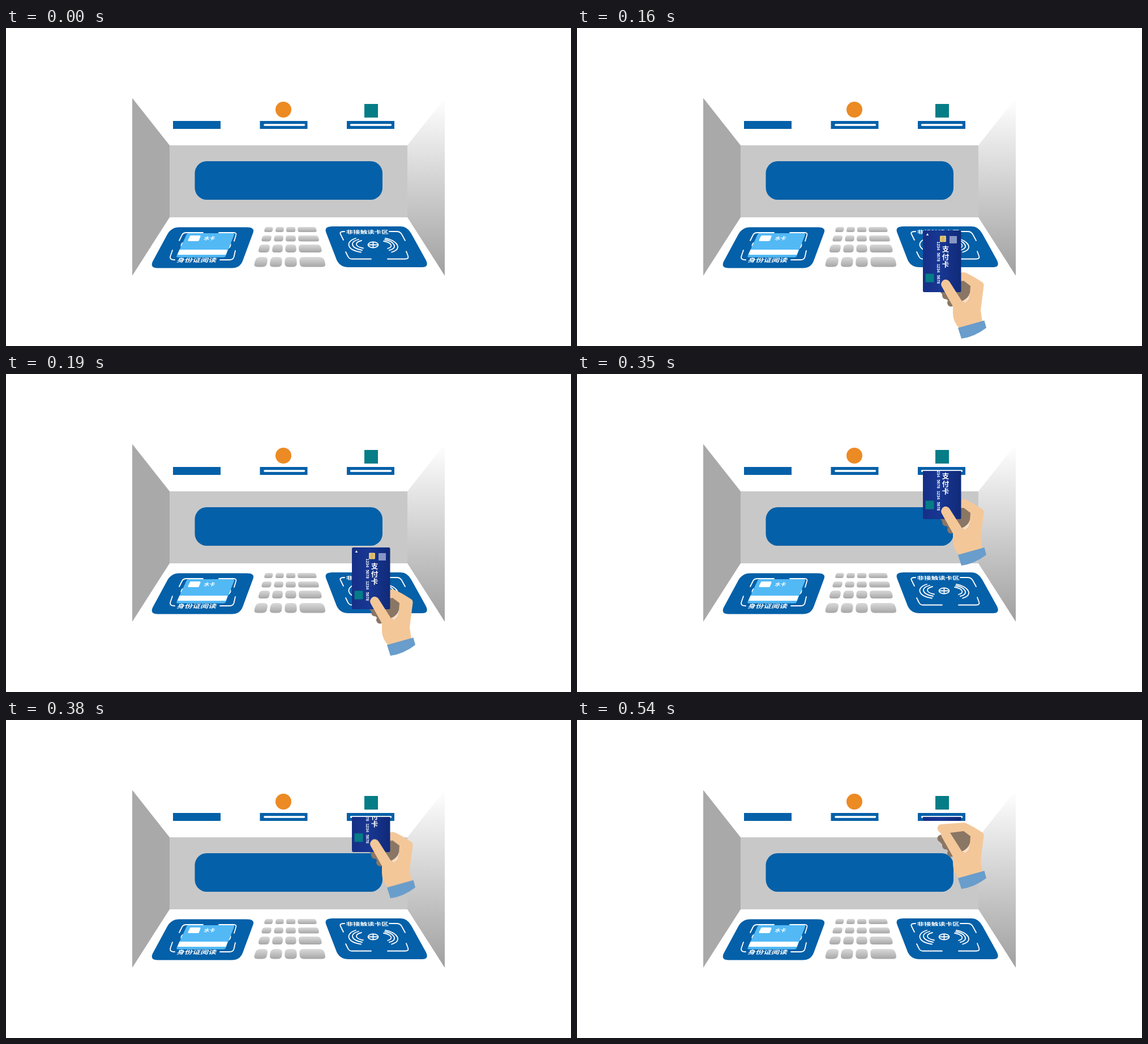
An HTML page for the animation above (1.37 s loop, 998 by 561 pixels).

```html
<!DOCTYPE html>
<html lang="zh">
<head>
<meta charset="utf-8">
<title>插卡演示</title>
<style>
  html, body { margin: 0; width: 100%; height: 100%; overflow: hidden; background: #fff; }
  svg { display: block; }
  text { font-family: "Noto Sans CJK SC", "Noto Sans CJK", sans-serif; font-weight: 700; fill: #fff; text-anchor: middle; }
  .digits { font-family: Arial, "Liberation Sans", sans-serif; font-size: 7px; word-spacing: 2.2px; text-anchor: start; }
  .blue { fill: #0460a8; }
  .line { fill: none; stroke: #fff; stroke-width: 1.8; stroke-linecap: round; stroke-linejoin: round; }
  .skin { fill: #f4c799; }
  .shade { fill: #8a7664; }
</style>
</head>
<body>
<svg width="998" height="561" viewBox="0 0 998 561">
  <defs>
    <linearGradient id="wall" x2="0" y2="1">
      <stop offset="0" stop-color="#fff"/>
      <stop offset="1" stop-color="#a0a0a0"/>
    </linearGradient>
    <linearGradient id="key" x2="0" y2="1">
      <stop offset="0" stop-color="#dadada"/>
      <stop offset="1" stop-color="#a6a6a6"/>
    </linearGradient>
    <linearGradient id="navy">
      <stop offset="0" stop-color="#162f86"/>
      <stop offset=".45" stop-color="#183793"/>
      <stop offset="1" stop-color="#102a78"/>
    </linearGradient>
    <clipPath id="slot"><rect x="600" y="171" width="100" height="390"/></clipPath>
  </defs>

  <!-- booth -->
  <path d="M223 123.500L289 207V334L223 437Z" fill="#a9a9a9"/>
  <path d="M775 123.500L709 207V334L775 437Z" fill="url(#wall)"/>
  <path d="M289 207H709V334H289Z" fill="#c8c8c8"/>
  <rect class="blue" x="333.500" y="235" width="331.500" height="68" rx="21"/>

  <!-- slots and marks -->
  <path class="blue" d="M295 164h84v14h-84ZM448.500 164h84v14h-84ZM602 164h84v14h-84Z"/>
  <path class="line" d="M457 171H526.500M609.500 171H679.500" style="stroke-width:3.6"/>
  <circle cx="490" cy="144" r="14" fill="#ec8a24"/>
  <rect x="633" y="134" width="24" height="24" fill="#057d87"/>

  <!-- left reader -->
  <path class="blue" d="M306 351.500H425Q440 351.500 436.500 361L418 411Q413 423.500 399 423.500H268Q254 423.500 259 412L285 364Q292 351.500 306 351.500Z"/>
  <path class="line" d="M306 375L311 365Q313 361 319 361H348M376 361H402Q408 361 406 366L403 376M294 392L290.500 402Q288 409 298 409M378 409H395Q401 409 402.500 404L405 393M312 379Q306 385 314 391M394 376Q400 384 392 389"/>
  <path d="M322 362H401Q403.500 362 403 365L388.500 401Q387.500 404.500 384 404.500H303Q300.500 404.500 301.500 402L319 364Q320 362 322 362Z" fill="#52b9f5"/>
  <path d="M306.500 391H391.500L388.500 400H302.500Z" fill="#fff"/>
  <path d="M327 366H342Q344 366 343.500 368L341 374.500Q340.500 376 339 376H323Q321 376 321.500 374L325 367Q325.500 366 327 366Z" fill="#fff"/>
  <text transform="translate(358.500 374) skewX(-18) scale(1 .85)" font-size="9.500">水卡</text>
  <text transform="translate(336 412.500) skewX(-18) scale(1 .68)" font-size="14">身份证阅读</text>

  <!-- keypad -->
  <g id="keys" fill="url(#key)"></g>

  <!-- right reader -->
  <path class="blue" d="M577 350H697Q709 350 716 363L741.500 409Q748 422 735 422H605Q590 422 584 409L565.500 361Q561 350 577 350Z"/>
  <path class="line" d="M596 374L591 364Q588 359 598 359M677 359H690Q696 359 699 364L705 375M600 395L604 403Q606 407.500 611 407.500H645M674 407.500H705Q712 407.500 710 402L707 394"/>
  <g class="line">
    <path d="M618 371C600 376 600 391 627 395.500M623 373C607 377 608 388 629 392M628 375C615 378 616 386 631 388.500"/>
    <path d="M670 371C690 374 702 390 681 395.500M669 373.500C685 376 694 388 677 392M667 376C680 378 686 386 674 389"/>
    <ellipse cx="648.500" cy="382.500" rx="9" ry="5"/>
    <path d="M648.500 378V387M640 382.500H657"/>
  </g>
  <text transform="translate(638.500 362.500) skewX(6) scale(1 .68)" font-size="12.500">非接触读卡区</text>

  <!-- hand behind the card -->
  <g class="hand">
    <g class="shade">
      <circle cx="643" cy="408" r="6.500"/>
      <circle cx="651.500" cy="421" r="6.500"/>
      <circle cx="660.500" cy="434" r="6.500"/>
      <path d="M643 401L680 425L664 440L640 413Z"/>
    </g>
    <path class="skin" d="M643 383L684 380Q692 382 716 397.500Q719 400 718.500 404L713 447L716 467L676 480Q663.500 466 664 452V439L646 401Q637 396 636.500 390Q637 384 643 383Z"/>
    <path class="shade" d="M659 398L683 395L695 404L693.500 424Q692 432 686 433L679 432Z"/>
    <path d="M679 431Q691 427 694.500 415L693.500 424Q692 432 685 433.500Z" fill="#fbdfc3"/>
    <path d="M673 478L719.500 465L723 478Q702 494 679 497Z" fill="#699dcb"/>
  </g>

  <!-- payment card -->
  <g clip-path="url(#slot)">
    <g class="card">
      <rect x="611" y="306" width="67.500" height="109" rx="2.500" fill="url(#navy)"/>
      <path d="M619 311L621.200 315H616.800Z" fill="#fff"/>
      <rect x="641" y="315.500" width="11" height="11" rx="1.500" fill="#e9cd7b"/>
      <path d="M641 319.200H652M641 322.800H652M646.500 315.500V326.500" stroke="#b08f45" stroke-width=".6"/>
      <rect x="658" y="316" width="13" height="13" fill="#8796c4"/>
      <g font-size="12.500">
        <text x="651" y="344">支</text>
        <text x="651" y="357.600">付</text>
        <text x="651" y="371.200">卡</text>
      </g>
      <text class="digits" transform="translate(636.300 325.500) rotate(90)">1234 5678 1234 5678</text>
      <rect x="615.500" y="382.500" width="15" height="15" fill="#057d87"/>
    </g>
  </g>

  <!-- thumb over the card -->
  <g class="hand">
    <path class="skin" d="M644.500 405.500A8 8 0 0 1 658 396.500L680 431L690 448L664 446V440Z"/>
  </g>
</svg>
<script>
  // Keypad: column edges as [left, right] at the top and bottom of the pad.
  const PAD = { top: 351, bottom: 421.5 };
  const rows = [[351, 360], [366, 376.5], [382, 396], [404, 421.5]];
  const cols = [[458, 472, 437, 460], [477, 491, 465, 487], [495, 511, 492, 514], [515, 547, 519, 565.5]];

  function roundPoly(points, r) {
    const toward = (a, b) => {
      const k = r / Math.hypot(b[0] - a[0], b[1] - a[1]);
      return [a[0] + (b[0] - a[0]) * k, a[1] + (b[1] - a[1]) * k];
    };
    const n = points.length;
    return points.map((p, i) => {
      const from = toward(p, points[(i + n - 1) % n]);
      const to = toward(p, points[(i + 1) % n]);
      return `${i ? "L" : "M"}${from}Q${p} ${to}`;
    }).join("") + "Z";
  }

  const keys = document.getElementById("keys");
  for (const [y1, y2] of rows) {
    for (const [l1, r1, l2, r2] of cols) {
      const at = (a, b, y) => [a + (b - a) * (y - PAD.top) / (PAD.bottom - PAD.top), y];
      const corners = [at(l1, l2, y1), at(r1, r2, y1), at(r1, r2, y2), at(l1, l2, y2)];
      const key = document.createElementNS("http://www.w3.org/2000/svg", "path");
      key.setAttribute("d", roundPoly(corners, (y2 - y1) * 0.4));
      keys.append(key);
    }
  }

  // Time in ms, vertical shift of the card, vertical shift of the hand.
  const LOOP = 1370;
  const steps = [
    [0, 400, 400], [130, 189, 189], [160, 51, 51], [190, 0, 0],
    [320, -96.5, -96.5], [350, -159, -159], [380, -182.5, -182.5],
    [510, -222, -194.5], [540, -237, -199], [LOOP, -237, -199]
  ];

  function play(selector, column) {
    const frames = steps.map(s => ({
      offset: s[0] / LOOP,
      transform: `translateY(${s[column]}px)`,
      easing: "steps(1, end)"
    }));
    for (const el of document.querySelectorAll(selector)) {
      el.animate(frames, { duration: LOOP, iterations: Infinity });
    }
  }

  play(".card", 1);
  play(".hand", 2);
</script>
</body>
</html>
```
